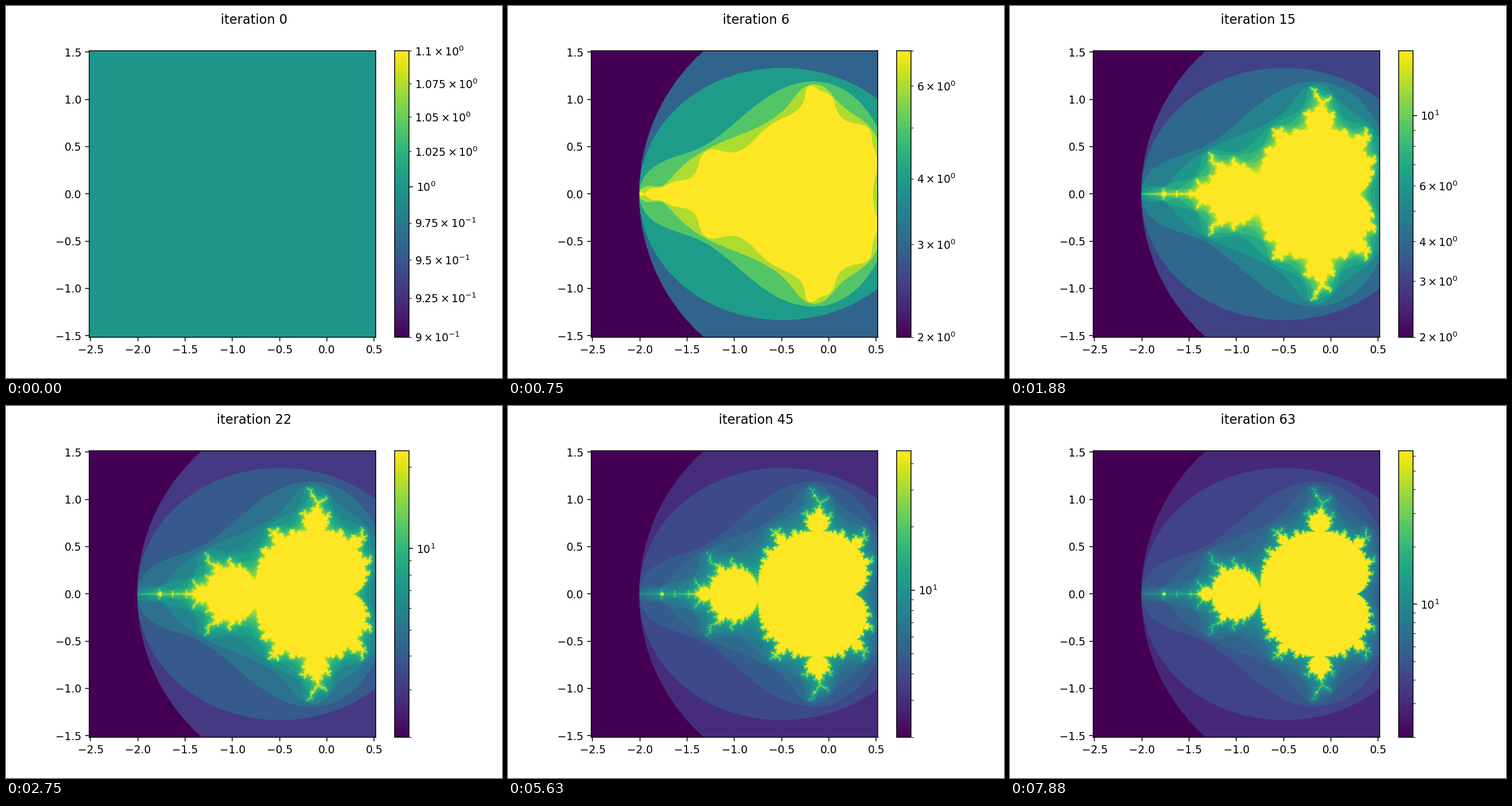
These frames come from a looping animation (864 px wide and 648 px high, 8 s). A matplotlib script:

```python
import matplotlib.pyplot as plt
import numpy as np
from matplotlib.animation import FuncAnimation
from matplotlib.colors import LogNorm

FRAMES = 64
INTERVAL = 125
SIZE = 500
EXTENT = (-2.515, 0.515, -1.515, 1.515)


def escape_counts(steps):
    """Step after which each point leaves the disc of radius 2, capped at steps."""
    x = np.linspace(-2.5, 0.5, SIZE)
    y = np.linspace(-1.5, 1.5, SIZE)
    c = (x[None, :] + 1j * y[:, None]).ravel()
    counts = np.full(c.size, steps, dtype=float)
    alive = np.arange(c.size)
    z = np.zeros_like(c)
    for n in range(1, steps):
        z = z * z + c
        inside = z.real ** 2 + z.imag ** 2 <= 4
        counts[alive[~inside]] = n + 1
        alive, z, c = alive[inside], z[inside], c[inside]
    return counts.reshape(SIZE, SIZE)


counts = escape_counts(FRAMES)
fig = plt.figure(figsize=(6.4, 4.8), dpi=135)


def draw(i):
    fig.clear()
    ax = fig.add_subplot()
    image = ax.imshow(np.minimum(counts, i + 1), norm=LogNorm(),
                      cmap="viridis", origin="lower", extent=EXTENT)
    fig.colorbar(image, ax=ax)
    fig.suptitle(f"iteration {i}")
    return []


anim = FuncAnimation(fig, draw, frames=FRAMES, interval=INTERVAL,
                     init_func=lambda: [], repeat=True, repeat_delay=0)
plt.show()
```
